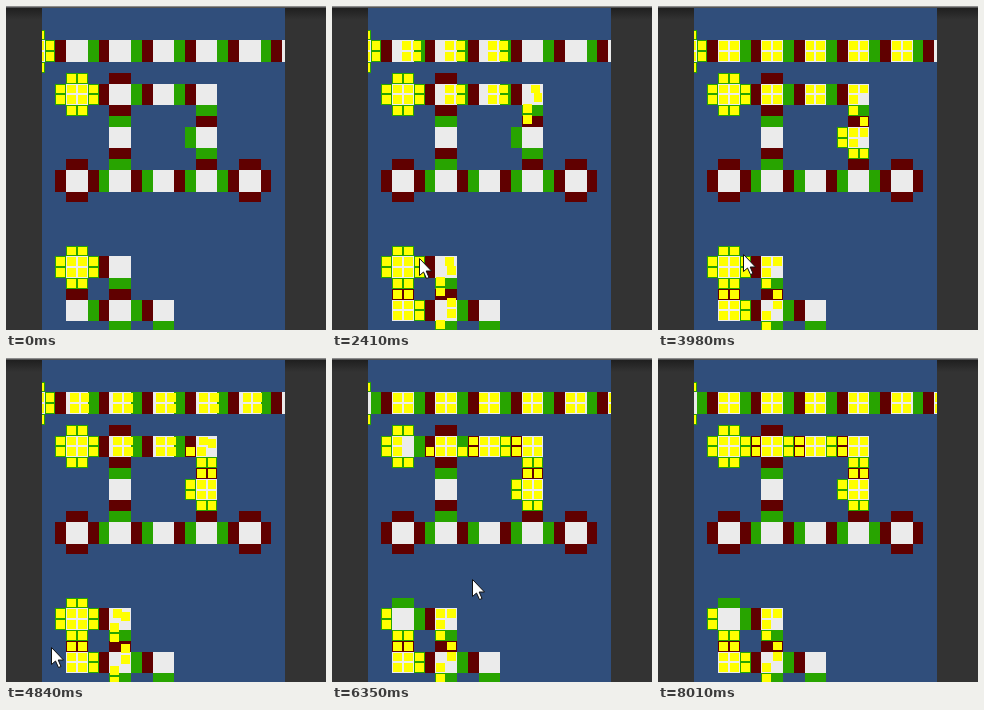
Recreate the animation shown at these times as an HTML page with a canvas. Size 320x324 px, loop 8.03 s.

```html
<!DOCTYPE html>
<html lang="en">
<head>
<meta charset="utf-8">
<title>Token flow</title>
<style>
html, body { margin: 0; width: 100%; height: 100%; overflow: hidden; background: #333; }
canvas { display: block; }
</style>
</head>
<body>
<canvas id="stage" width="320" height="324"></canvas>
<script>
const ctx = document.getElementById("stage").getContext("2d");
const LOOP = 8030, START = 120, STEP = 205, EASE = 22;
const CELL = 10.8, OX = 60.2, OY = 34.4;
const LEFT = 36, RIGHT = 279;
const GREEN = "#28a400", RED = "#600000";
const DIRS = { U: [0, -1], R: [1, 0], D: [0, 1], L: [-1, 0] };
const OPPOSITE = { U: "D", R: "L", D: "U", L: "R" };

const px = x => Math.round(OX + x * CELL);
const py = y => Math.round(OY + y * CELL);

function fillCells(x, y, w, h, color, inset = 0) {
  const l = px(x) + inset, t = py(y) + inset;
  ctx.fillStyle = color;
  ctx.fillRect(l, t, px(x + w) - inset - l, py(y + h) - inset - t);
}

const token = (x, y) => fillCells(x, y, 1, 1, "#ff0", 1);

function tokens(x, y, w, h) {
  for (let i = 0; i < w * h; i++) token(x + i % w, y + Math.floor(i / w));
}

// A node is 2 x 2 cells on a pitch of 4; its ports are one cell deep.
function ports(col, row, sides, color) {
  for (const side of sides) {
    const [dx, dy] = DIRS[side];
    fillCells(col * 4 + (dx > 0 ? 2 : dx), row * 4 + (dy > 0 ? 2 : dy),
      dx ? 1 : 2, dy ? 1 : 2, color);
  }
}

// A run of linked nodes: green where it leaves a node, red where it enters.
function pipe(col, row, route) {
  const node = () => fillCells(col * 4, row * 4, 2, 2, "#ebebeb");
  node();
  for (const side of route) {
    ports(col, row, side, GREEN);
    col += DIRS[side][0];
    row += DIRS[side][1];
    node();
    ports(col, row, OPPOSITE[side], RED);
  }
}

function drawBoard() {
  pipe(-1, 0, "RRRRRR");
  pipe(0, 1, "RRRDD");
  pipe(3, 3, "LLL");
  pipe(3, 3, "R");
  pipe(1, 3, "UU");
  pipe(0, 5, "RDD");
  pipe(0, 5, "DRRD");
  ports(-1, 0, "UD", GREEN);
  ports(0, 1, "UDL", GREEN);
  ports(0, 5, "UL", GREEN);
  ports(3, 2, "L", GREEN);
  ports(1, 1, "U", RED);
  ports(0, 3, "UDL", RED);
  ports(4, 3, "UDR", RED);
}

// Lanes turn a slot number into a cell: straight on, then round one corner.
const rightThenDown = (x, y, corner) => i =>
  x + i <= corner ? [x + i, y] : [corner, y + x + i - corner];
const downThenRight = (x, y, corner) => i =>
  y + i <= corner ? [x, y + i] : [x + y + i - corner, corner];

const lanes = [
  { at: rightThenDown(-3, 0, 99) },
  { at: rightThenDown(-3, 1, 99) },
  { at: rightThenDown(1, 4, 13), last: 18, exit: [11, 8] },
  { at: rightThenDown(1, 5, 12), last: 16, exit: [11, 9] },
  { at: rightThenDown(1, 20, 5) },
  { at: rightThenDown(1, 21, 4) },
  { at: downThenRight(0, 21, 25), last: 6 },
  { at: downThenRight(1, 21, 24), last: 4 }
];

// Every fourth step a lane sends two tokens; closed lanes queue from their end.
function drawLane({ at, last = Infinity, exit }, n, mix, early) {
  const spare = exit ? 0 : 1;
  for (let k = 0; 4 * k <= n + (early ? 1 : 0); k++) {
    const limit = last - spare - 2 * k;
    if (limit < 0) break;
    const cellAt = (step, part) => {
      const slot = Math.max(0, Math.min(step - 4 * k, limit)) + part;
      if (exit && k === 0 && slot >= last) return part ? at(last) : exit;
      return at(slot);
    };
    for (const part of [0, 1]) {
      const a = cellAt(n - 1, part), b = cellAt(n, part);
      token(a[0] + (b[0] - a[0]) * mix, a[1] + (b[1] - a[1]) * mix);
    }
  }
}

function drawTokens(t) {
  const u = (t - START) / STEP;
  const n = Math.floor(u) + 1, frac = u - Math.floor(u);
  const mix = 1 - Math.exp(-frac * STEP / EASE);
  const early = n % 4 === 3 && frac > 0.7;

  tokens(-4, -1, 2, 1);
  tokens(-4, 2, 2, 1);
  tokens(-1, 4, 2, 2);
  tokens(0, 3, 2, 1);
  tokens(0, 6, 2, 1);
  tokens(-1, 20, 1, 2);
  if (n % 4 === 0 || early) {
    tokens(0, 19, 2, 3);
    tokens(2, 20, 1, 2);
  }
  for (const lane of lanes) drawLane(lane, n, mix, early);
}

// time, x, y of the pointer's tip
const pointer = [
  [1480, 25, 326], [2410, 87, 252], [3980, 85, 248], [5250, 26, 308],
  [5720, 94, 286], [6980, 185, 157], [7720, 276, 326]
];
const arrow = new Path2D("M0 0V17L4 13.5L7 20L9.5 19L6.7 12.5H12Z");

function drawPointer(t) {
  const i = pointer.findIndex(p => p[0] > t);
  if (i < 1) return;
  const [t0, x0, y0] = pointer[i - 1], [t1, x1, y1] = pointer[i];
  const f = (t - t0) / (t1 - t0);
  ctx.save();
  ctx.translate(Math.round(x0 + (x1 - x0) * f) + 0.5, Math.round(y0 + (y1 - y0) * f) + 0.5);
  ctx.fillStyle = "#fff";
  ctx.strokeStyle = "#111";
  ctx.fill(arrow);
  ctx.stroke(arrow);
  ctx.restore();
}

const shade = ctx.createLinearGradient(0, 2, 0, 14);
shade.addColorStop(0, "#1f1f1f");
shade.addColorStop(1, "#333");

function draw(t) {
  ctx.fillStyle = shade;
  ctx.fillRect(0, 0, 320, 324);
  ctx.save();
  ctx.beginPath();
  ctx.rect(LEFT, 0, RIGHT - LEFT, 324);
  ctx.clip();
  ctx.fillStyle = "#304e7b";
  ctx.fillRect(LEFT, 0, RIGHT - LEFT, 324);
  drawBoard();
  drawTokens(t);
  ctx.restore();
  ctx.fillStyle = "#8c8c8c";
  ctx.fillRect(0, 0, 320, 1);
  ctx.fillStyle = "#555";
  ctx.fillRect(0, 1, 320, 1);
  drawPointer(t);
}

const begin = performance.now();
function tick() {
  draw((performance.now() - begin) % LOOP);
  requestAnimationFrame(tick);
}
tick();
</script>
</body>
</html>
```
